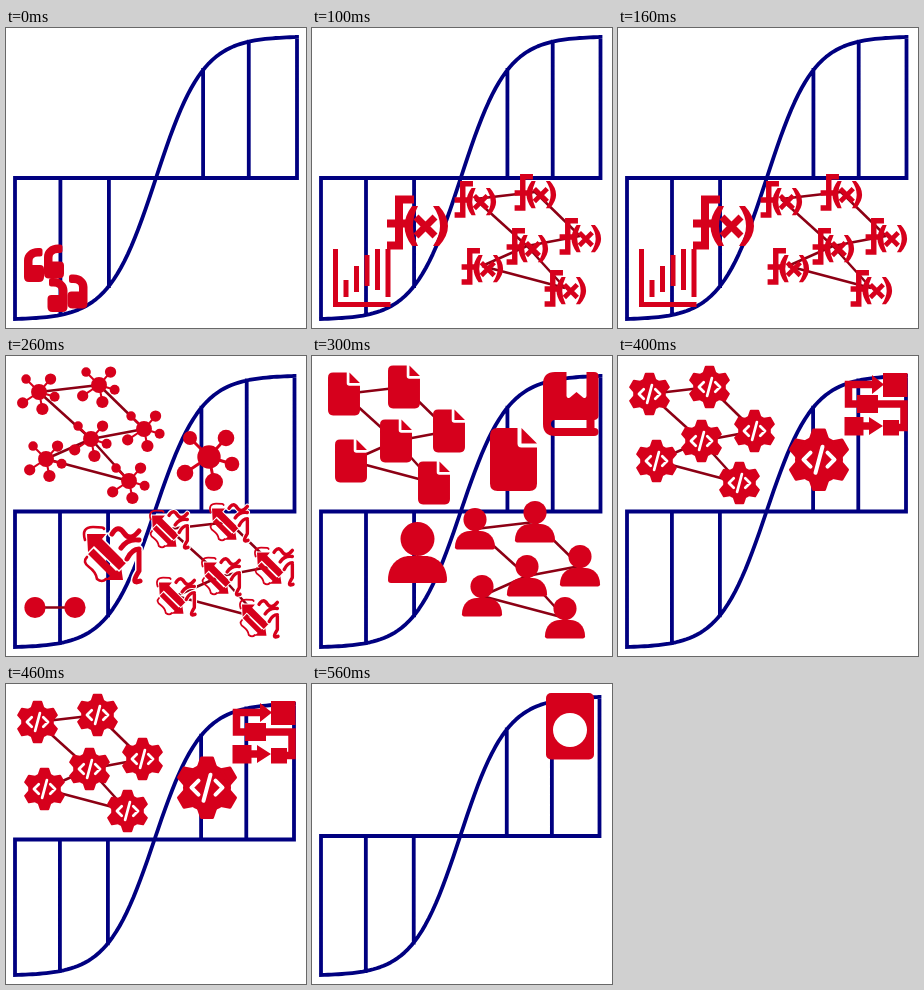
Animation of 300x300 px, one loop 600 ms. Source, as an HTML page with a canvas:

```html
<!DOCTYPE html>
<html>
<head>
<meta charset="utf-8">
<style>
  html, body { margin: 0; width: 100%; height: 100%; overflow: hidden; background: #fff; }
  canvas { display: block; }
</style>
</head>
<body>
<canvas id="stage" width="300" height="300"></canvas>
<script>
const ctx = document.getElementById('stage').getContext('2d');
const NAVY = '#000080', RED = '#d6001c', DARK = '#8c0014', SMALL = 0.68;

const fill = (d, color = RED) => { ctx.fillStyle = color; ctx.fill(new Path2D(d)); };
const line = (d, width, color = RED) => {
  ctx.strokeStyle = color;
  ctx.lineWidth = width;
  ctx.stroke(new Path2D(d));
};
const dot = (x, y, r, color = RED) => {
  ctx.fillStyle = color;
  ctx.beginPath();
  ctx.arc(x, y, r, 0, 7);
  ctx.fill();
};
const box = (x, y, w, h, r = 0) => {
  ctx.fillStyle = RED;
  ctx.beginPath();
  ctx.roundRect(x, y, w, h, r);
  ctx.fill();
};
const at = (x, y, sx, sy, draw) => {
  ctx.save();
  ctx.translate(x, y);
  ctx.scale(sx, sy);
  draw();
  ctx.restore();
};

// S-curve with its ordinates, fitted between (9, 291) and (right, top)
function chart(right, top) {
  const X = u => 9 + u * (right - 9);
  const logistic = u => 1 / (1 + Math.exp(-12 * (u - 0.5)));
  const low = logistic(0);
  const Y = u => 291 - (291 - top) * (logistic(u) - low) / (1 - 2 * low);
  const mid = Y(0.5);
  let d = `M9 ${mid}H${right}`;
  for (const u of [0, 0.161, 0.333, 0.667, 0.829, 1]) d += `M${X(u)} ${mid}V${Y(u)}`;
  d += 'M9 291';
  for (let i = 1; i <= 80; i++) d += `L${X(i / 80)} ${Y(i / 80)}`;
  ctx.lineCap = 'square';
  ctx.lineJoin = 'round';
  line(d, 3.8, NAVY);
  ctx.lineCap = 'butt';
  ctx.lineJoin = 'miter';
}

const nodes = [[163, 171], [223, 164], [268, 208], [215, 218], [170, 238], [253, 260]];
const links = [[0, 1], [0, 3], [1, 2], [2, 3], [3, 4], [3, 5], [4, 5]];

function network(dx, dy, icon) {
  for (const [a, b] of links) {
    line(`M${nodes[a][0] + dx} ${nodes[a][1] + dy}L${nodes[b][0] + dx} ${nodes[b][1] + dy}`, 2.5, DARK);
  }
  for (const [x, y] of nodes) at(x + dx, y + dy, SMALL, SMALL, icon);
}

// Icons, centred on the origin
function formula() {
  line('M-3 -22.5H-18V23.5H-30M-30 1.5H-8', 8);
  fill('M-5 -16H1Q-9 4 1 24H-5Q-19 4 -5 24Q-20 4 -5 -16Z');
  fill('M16 -16H22Q40 4 22 24H16Q30 4 16 -16Z');
  line('M-1 -5L18 14M18 -5L-1 14', 7);
}

function molecule() {
  for (const [x, y, r] of [[-19, -19, 7], [17, -19, 8.3], [23, 7, 7.3], [5, 25, 9], [-24, 16, 8.3]]) {
    line(`M0 0L${x} ${y}`, 3);
    dot(x, y, r);
  }
  dot(0, 0, 11.7);
}

function protein() {
  const arrow = 'M-25 -20H-6L-10 -15L14 9L7 16L-18 -8L-24 -2Z';
  const coil = 'M0 -20Q6 -30 12 -21T27 -23M9 -6Q16 -16 27 -14M15 5Q20 -5 27 -5M27 -3V17Q18 31 28 27';
  fill('M-19 -6L4 17L9 12L11 26H-7L-2 22L-25 -1Z');
  line(arrow, 3, '#fff');
  fill(arrow);
  ctx.lineCap = ctx.lineJoin = 'round';
  line('M-27 -14Q-31 -27 -19 -27T-8 -25M-25 3Q-30 8 -23 13T-15 25Q-10 29 -6 25', 2.6);
  line(coil, 8, '#fff');
  line(coil, 5);
  ctx.lineCap = 'butt';
  ctx.lineJoin = 'miter';
}

function page() {
  fill('M-23.5 -24Q-23.5 -31.5 -16 -31.5H4V-16Q4 -12 8 -12H23.5V24Q23.5 31.5 16 31.5H-16Q-23.5 31.5 -23.5 24Z');
  fill('M8 -31.5L23.5 -16H8Z');
}

function person() {
  dot(0, -14, 17);
  fill('M-29.5 27C-29.5 11 -18 3 -8 3H8C18 3 29.5 11 29.5 27Q29.5 30 26.5 30H-26.5Q-29.5 30 -29.5 27Z');
}

function gear() {
  dot(0, 0, 24);
  ctx.lineJoin = 'round';
  for (let i = 0; i < 6; i++) {
    ctx.save();
    ctx.rotate(i * Math.PI / 3);
    const tooth = 'M-8.5 -21L-5.5 -29.7H5.5L8.5 -21Z';
    fill(tooth);
    line(tooth, 3);
    ctx.restore();
  }
  ctx.lineCap = 'round';
  line('M-8.5 -7L-15.5 0L-8.5 7M8.5 -7L15.5 0L8.5 7M3.5 -13L-3.5 13', 4, '#fff');
  ctx.lineCap = 'butt';
  ctx.lineJoin = 'miter';
}

// Single pieces
function quotes() {
  const mark = 'M16 17H8.5V13Q8.5 8.5 14 8.5H16Q18.5 8.5 18.5 6V2.5Q18.5 0 16 0H14'
    + 'C6 0 0 5.5 0 12.5V29Q0 34 5 34H15Q20 34 20 29V21Q20 17 16 17Z';
  const pair = [[18, 220, 1], [38, 216.5, 1], [61.5, 250, -1], [81.5, 246.5, -1]];
  for (const [x, y, flip] of pair) at(x, y, flip, 1, () => fill(mark));
}

function bars() {
  line('M23.5 221V276.5H78.5', 5);
  line('M34 252V269M44.5 238V264M55 227V258M65.5 221V262M76 221V269', 5);
}

function book() {
  fill('M231 28Q231 16 243 16H254.5V40Q255 43 258 41.5L264.5 36L271 41.5Q274 43 274.5 40V16H282'
    + 'Q286.5 16 286.5 20V60Q286.5 63 282.5 64V72Q286.5 72 286.5 76T282 80H243Q231 80 231 68Z'
    + 'M243 64Q239 64 239 68T243 72H274.5V64Z');
}

function flow() {
  box(265, 17, 24.5, 24);
  box(239, 39, 21, 18);
  box(226.5, 61, 19, 18.5);
  box(265, 64, 16, 15.5);
  line('M240 48H230.5V28.5H256M259 48H286V71.5H280M245 70H253', 7.5);
  fill('M254 19L266 28.5L254 38ZM251 61L265 70L251 79Z');
}

function card() {
  box(234, 9, 48, 66.5, 5);
  dot(258, 46, 17, '#fff');
}

const scenes = [
  () => { chart(291, 9); quotes(); },
  () => {
    chart(288.5, 9);
    bars();
    at(105, 194, 1, 1, formula);
    network(0, 0, formula);
  },
  () => {
    chart(288.5, 20);
    line('M29 251.5H69', 2.6, DARK);
    dot(29, 251.5, 10.6);
    dot(69, 251.5, 10.6);
    at(106, 198, 1, 1, protein);
    network(0, 2, protein);
    at(203, 101, 1, 1, molecule);
    network(-130, -135, molecule);
  },
  () => {
    chart(288.5, 20);
    at(105.5, 197, 1, 1, person);
    network(0, 2, person);
    at(201.5, 103.5, 1, 1, page);
    network(-131, -133, page);
    book();
  },
  () => {
    chart(288, 20);
    at(201, 103.7, 1, 1, gear);
    network(-131.5, -133, gear);
    flow();
  },
  () => { chart(287.5, 13); card(); }
];

const start = performance.now();
function tick() {
  const t = performance.now() - start;
  ctx.fillStyle = '#fff';
  ctx.fillRect(0, 0, 300, 300);
  scenes[Math.floor(t / 100) % scenes.length]();
  requestAnimationFrame(tick);
}
tick();
</script>
</body>
</html>
```
